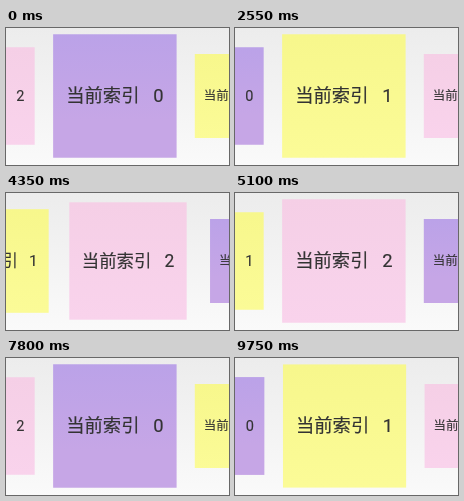
Write an HTML page that moves like this. It is 223 px wide and 137 px high and loops after 9900 ms.

```html
<!DOCTYPE html>
<html lang="zh-CN">
<head>
<meta charset="utf-8">
<title>Carousel</title>
<style>
html, body { margin: 0; width: 100%; height: 100%; overflow: hidden; }
#stage {
  position: relative; width: 223px; height: 137px; overflow: hidden;
  background: linear-gradient(#ececec, #fafafa);
}
.card {
  position: absolute; left: 0; top: -2.5px; width: 140px; height: 140px;
  font: 20.8px/141px Roboto, "Noto Sans CJK SC", "Noto Sans CJK", sans-serif;
  color: #333; text-align: center; white-space: pre;
  -webkit-text-stroke: 0.2px #333;
}
.c0 { background: linear-gradient(#bba2e8, #c6a6e6 70%); }
.c1 { background: linear-gradient(#f7f78c, #fbfb97); }
.c2 { background: linear-gradient(#f5cfe6, #f9d3ec); }
</style>
</head>
<body>
<div id="stage"></div>
<script>
const LOOP = 9900, STEP = 150;
const W = 140, PITCH = 147.5, PAD = 41.3, MIN = 0.6;

// start time, ease-out phase left at the start, full duration
const slides = [
  [1200, 0.85, 1140],
  [3900, 0.864, 1140],
  [6450, 0.835, 1190],
  [9150, 0.74, 1060]
];

const stage = document.getElementById('stage');
const cards = [];
for (let i = -1; i <= 5; i++) {
  const index = (i + 3) % 3;
  const el = document.createElement('div');
  el.className = 'card c' + index;
  el.textContent = '当前索引   ' + index;
  stage.append(el);
  cards.push({ el, i });
}

const clamp = (v, lo, hi) => Math.min(hi, Math.max(lo, v));

function scrollAt(t) {
  let pos = 0;
  for (const [start, phase, dur] of slides) {
    if (t >= start) pos += 1 - Math.max(0, phase - (t - start) / dur) ** 3;
  }
  return pos;
}

// Cards grow towards the left edge of the stage, pivoting on the side that faces it.
function place({ el, i }, scroll) {
  const left = PAD + (i - scroll) * PITCH;
  const p = clamp(left / W, -1, 1);
  const scale = 1 - (1 - MIN) * Math.abs(p);
  el.style.transformOrigin = 50 * (1 - p) + '% 50%';
  el.style.transform = `translateX(${left}px) scale(${scale})`;
}

const t0 = performance.now();
function draw() {
  const t = Math.max(0, performance.now() - t0) % LOOP;
  const scroll = scrollAt(Math.floor(t / STEP) * STEP);
  cards.forEach(c => place(c, scroll));
  requestAnimationFrame(draw);
}
draw();
</script>
</body>
</html>
```
